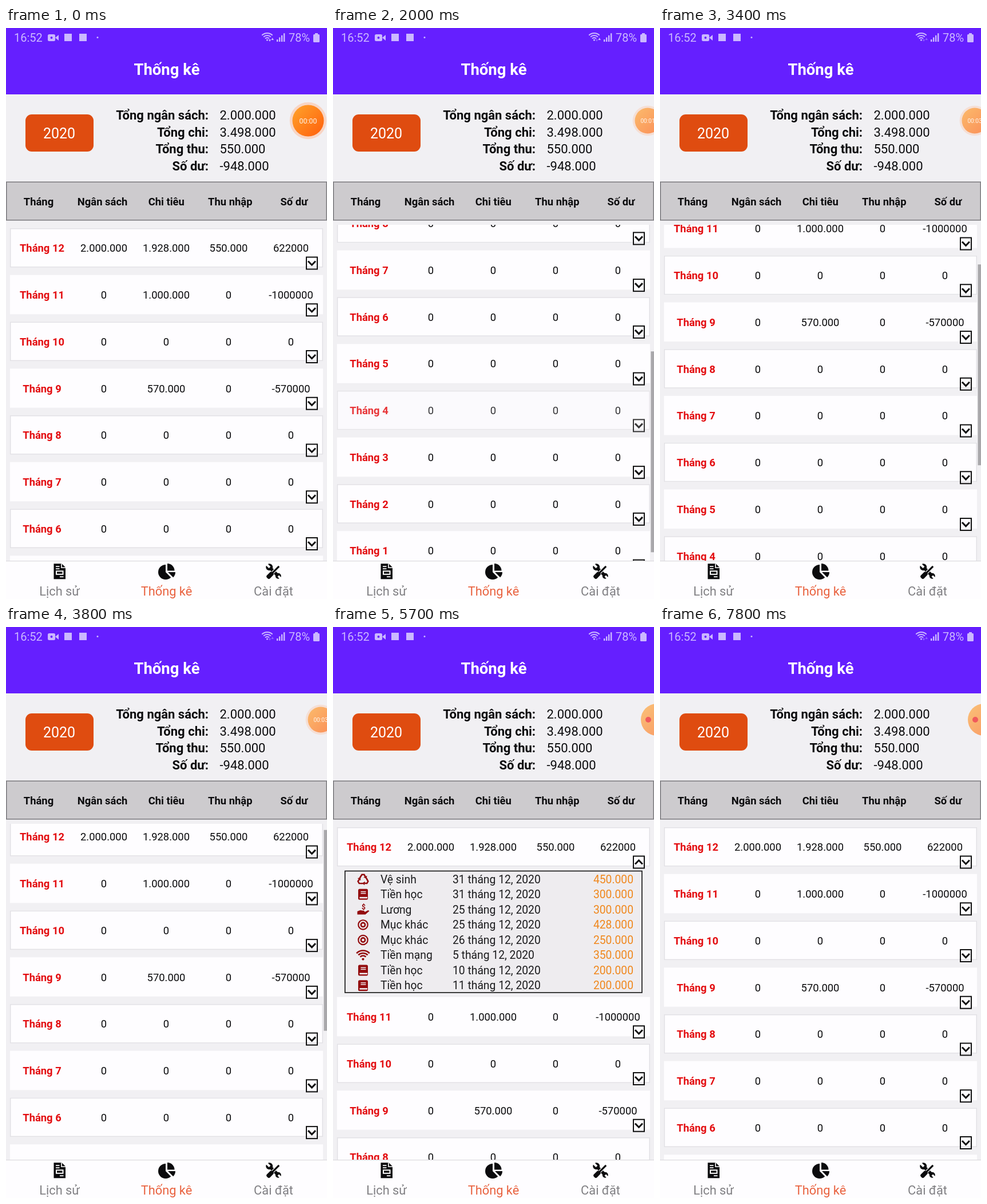
These frames come from a looping animation (561 by 998 pixels, 8000 ms). An HTML page with a canvas:

```html
<!DOCTYPE html>
<html lang="vi">
<head>
<meta charset="utf-8">
<title>Thống kê</title>
<style>
html, body { margin: 0; width: 100%; height: 100%; overflow: hidden; background: #f1f0f3; }
canvas { display: block; }
</style>
</head>
<body>
<canvas id="stage" width="561" height="998"></canvas>
<script>
const ctx = document.getElementById('stage').getContext('2d');
const LOOP = 8000, W = 561;
const VIEW_TOP = 344, VIEW_BOTTOM = 931, MAX_SCROLL = 394;
const PITCH = 81.75, PANEL = 215;
const PURPLE = '#651fff', LILAC = '#cbb8ff', BG = '#f1f0f3', INK = '#0b0b0d', MAROON = '#930c0e';

const COLS = [63, 171, 280, 389, 498];
const FILLED = {
  12: ['2.000.000', '1.928.000', '550.000', '622000'],
  11: ['0', '1.000.000', '0', '-1000000'],
  9: ['0', '570.000', '0', '-570000']
};
const DETAILS = [
  ['recycle', 'Vệ sinh', 31, '450.000'],
  ['book', 'Tiền học', 31, '300.000'],
  ['hand', 'Lương', 25, '300.000'],
  ['target', 'Mục khác', 25, '428.000'],
  ['target', 'Mục khác', 26, '250.000'],
  ['wifi', 'Tiền mạng', 5, '350.000'],
  ['book', 'Tiền học', 10, '200.000'],
  ['book', 'Tiền học', 11, '200.000']
];

// Keyframes as [time, value] pairs, linear in between
const SCROLL = [[420, 0], [600, 40], [800, 100], [1100, 194], [1400, 272], [1600, 300], [1750, 300],
  [2000, 370], [2200, MAX_SCROLL], [2650, MAX_SCROLL], [2900, 322], [3400, 116], [3700, 30], [3900, 6], [4100, 0]];
const BAR_ALPHA = [[400, 0], [500, 1], [4550, 1], [4750, 0]];
const BUBBLE_X = [[900, 528], [1100, 534], [1350, 550], [4930, 550], [5080, 566]];
const BUBBLE_R = [[900, 27.5], [1100, 26], [1350, 22.5], [4930, 22.5], [5080, 28]];
const BUBBLE_ALPHA = [[700, 1], [1050, 0.62]];
const FIRST_ROW = [[4930, 1], [5080, 0.8], [5330, 0.8], [5500, 1], [7230, 1], [7290, 0.8], [7540, 0.8], [7700, 1]];
const BRUSHED_ROW = [[1850, 1], [1920, 0.83], [2000, 0.83], [2150, 1]];

function at(keys, t) {
  if (t <= keys[0][0]) return keys[0][1];
  for (let i = 1; i < keys.length; i++) {
    const [t0, a] = keys[i - 1], [t1, b] = keys[i];
    if (t <= t1) return a + (b - a) * (t - t0) / (t1 - t0);
  }
  return keys[keys.length - 1][1];
}

const easeOut = (t, start, length) =>
  1 - (1 - Math.min(1, Math.max(0, (t - start) / length))) ** 3;

function text(str, x, y, size, color = INK, align = 'center', weight = 400) {
  ctx.font = `${weight} ${size}px Roboto, sans-serif`;
  ctx.textAlign = align;
  ctx.fillStyle = color;
  ctx.fillText(str, x, y);
}

function rect(x, y, w, h, color, radius = 0) {
  ctx.fillStyle = color;
  ctx.beginPath();
  ctx.roundRect(x, y, w, h, radius);
  ctx.fill();
}

function frame(x, y, w, h, color, width) {
  ctx.strokeStyle = color;
  ctx.lineWidth = width;
  ctx.strokeRect(x, y, w, h);
}

function line(points, color, width, cap = 'butt') {
  ctx.strokeStyle = color;
  ctx.lineWidth = width;
  ctx.lineCap = cap;
  ctx.beginPath();
  points.forEach(([x, y]) => ctx.lineTo(x, y));
  ctx.stroke();
}

function poly(points, color) {
  ctx.fillStyle = color;
  ctx.beginPath();
  points.forEach(([x, y]) => ctx.lineTo(x, y));
  ctx.fill();
}

function disc(x, y, r, color) {
  ctx.fillStyle = color;
  ctx.beginPath();
  ctx.arc(x, y, r, 0, 7);
  ctx.fill();
}

function arc(x, y, r, from, to, color, width) {
  ctx.strokeStyle = color;
  ctx.lineWidth = width;
  ctx.lineCap = 'butt';
  ctx.beginPath();
  ctx.arc(x, y, r, from * Math.PI, to * Math.PI);
  ctx.stroke();
}

function placed(x, y, turn, draw) {
  ctx.save();
  ctx.translate(x, y);
  ctx.rotate(turn);
  draw();
  ctx.restore();
}

function waves(x, y, radii, color, width) {
  radii.forEach(r => arc(x, y, r, 1.25, 1.75, color, width));
  disc(x, y - 1, width * 0.8, color);
}

const ICONS = {
  recycle() {
    for (let i = 0; i < 3; i++) placed(0, 1, i * Math.PI * 2 / 3, () => {
      line([[-5.5, -3.5], [-2, -9], [2, -9], [4, -5.5]], MAROON, 2.6);
      poly([[0.8, -4.5], [7, -7], [6, -1.5]], MAROON);
    });
  },
  book() {
    rect(-8.5, -9.5, 17, 19, MAROON, 2.5);
    rect(-4, -5.5, 9, 1.5, BG);
    rect(-4, -2.5, 9, 1.5, BG);
    rect(-6, 4.5, 13.5, 2.5, BG);
  },
  hand() {
    text('$', 1, 0, 12, MAROON, 'center', 700);
    poly([[-10, 3], [-5, 1], [2, 2], [3, 4], [9, 1], [11, 2.5], [4, 8.5], [-10, 8.5]], MAROON);
  },
  target() {
    arc(0, 0, 8.2, 0, 2, MAROON, 2.2);
    arc(0, 0, 3.6, 0, 2, MAROON, 2.6);
  },
  wifi() {
    waves(0, 8, [7, 11.5, 16], MAROON, 2.6);
  }
};

function statusBar(t) {
  text('16:52', 14, 24, 20, LILAC, 'left');
  rect(73, 11, 13, 12, LILAC, 2.5);
  poly([[86, 17], [92, 12], [92, 22]], LILAC);
  disc(79.5, 17, 2, PURPLE);
  rect(102, 10, 13, 13, LILAC);
  rect(128, 10, 13, 13, LILAC);
  disc(160, 16.5, 1.5, LILAC);
  waves(456.5, 22, [5, 9, 13], LILAC, 2);
  const up = t < 2300 ? LILAC : '#8d62ff', down = t < 300 ? LILAC : '#8d62ff';
  poly([[459, 20], [463, 20], [461, 24]], down);
  poly([[463.5, 21], [468, 21], [465.7, 17]], up);
  for (let i = 0; i < 4; i++) rect(473 + i * 4, 20 - i * 3.6, 2.4, 4 + i * 3.6, LILAC);
  text('78%', 494, 24, 20, LILAC, 'left');
  rect(540, 9, 5, 3, LILAC);
  rect(537, 11, 11, 14, LILAC, 1.5);
}

function summary() {
  rect(34, 151, 119, 65, '#df4c10', 11);
  text('2020', 93, 193, 25, '#fff');
  [['Tổng ngân sách:', '2.000.000'], ['Tổng chi:', '3.498.000'], ['Tổng thu:', '550.000'], ['Số dư:', '-948.000']]
    .forEach(([label, value], i) => {
      const y = 160 + i * 29.6;
      text(label, 354, y, 22, INK, 'right', 700);
      text(value, 373.5, y, 22, INK, 'left');
    });
}

function tableHead() {
  rect(0, 268.5, W, 68, '#cdcbce');
  frame(0.75, 269.25, W - 1.5, 66.5, '#7d7c80', 1.5);
  ['Tháng', 'Ngân sách', 'Chi tiêu', 'Thu nhập', 'Số dư']
    .forEach((label, i) => text(label, 57 + i * 111.6, 310, 18.4, INK, 'center', 700));
}

function chevron(y, open) {
  const s = open ? -1 : 1;
  frame(525, y - 10.5, 19, 21, '#111', 2);
  line([[528, y - 3.5 * s], [534.5, y + 3.2 * s], [541, y - 3.5 * s]], '#111', 3);
}

function row(index, y, alpha, open) {
  const month = 12 - index, base = y + 41.3;
  ctx.globalAlpha = alpha;
  rect(7, y, 547, 68.5, '#fefdff');
  if (index % 2 === 0) frame(7.75, y + 0.75, 545.5, 67, '#e2e1e5', 1.5);
  text('Tháng ' + month, COLS[0], base, 18.4, '#e30d10', 'center', 700);
  (FILLED[month] || ['0', '0', '0', '0']).forEach((v, i) => text(v, COLS[i + 1], base, 18.4));
  chevron(y + 61, open);
  ctx.globalAlpha = 1;
}

function panel(growth) {
  ctx.save();
  ctx.beginPath();
  ctx.rect(0, 425, W, PANEL * growth);
  ctx.clip();
  rect(21, 426, 519, 213, '#eeecef');
  frame(21, 426.5, 519, 212.5, '#111', 1.6);
  DETAILS.forEach(([icon, name, day, amount], i) => {
    const y = 440.8 + i * 26.55;
    placed(52.5, y, 0, ICONS[icon]);
    text(name, 83, y + 6.8, 19.3, '#1b1b1d', 'left');
    text(day + ' tháng 12, 2020', 209, y + 6.8, 19.3, '#1b1b1d', 'left');
    text(amount, 525, y + 6.8, 19.3, '#f0871c', 'right');
  });
  ctx.restore();
}

function list(t) {
  const scroll = at(SCROLL, t);
  const growth = easeOut(t, 5330, 350) - easeOut(t, 7530, 265);
  const open = t >= 5370 && t < 7570;
  ctx.save();
  ctx.beginPath();
  ctx.rect(0, VIEW_TOP, W, VIEW_BOTTOM - VIEW_TOP);
  ctx.clip();
  if (growth > 0) panel(growth);
  for (let i = 0; i < 12; i++) {
    const y = 350 + i * PITCH - scroll + (i ? PANEL * growth : 0);
    const alpha = i === 0 ? at(FIRST_ROW, t) : i === 8 ? at(BRUSHED_ROW, t) : 1;
    if (y < VIEW_BOTTOM) row(i, y, alpha, i === 0 && open);
  }
  ctx.globalAlpha = at(BAR_ALPHA, t);
  rect(555.5, VIEW_TOP + scroll * 0.598, 5.5, 351, '#a9a8ab');
  ctx.restore();
}

function bubble(t) {
  const x = at(BUBBLE_X, t), r = at(BUBBLE_R, t), y = 162;
  const recording = t >= 4980;
  const fill = ctx.createLinearGradient(x - r, y - r, x + r, y + r);
  fill.addColorStop(0.1, '#ff9d28');
  fill.addColorStop(0.9, '#ff650f');
  ctx.globalAlpha = at(BUBBLE_ALPHA, t);
  if (!recording) disc(x, y, r * 1.17, '#f8d5c4');
  disc(x, y, r, fill);
  ctx.globalAlpha = 1;
  if (recording) {
    disc(551, y, 5, '#f05a5c');
  } else {
    const seconds = [1000, 2300, 3300, 4400].filter(mark => t >= mark).length;
    text('00:0' + seconds, x, y + r * 0.17, r * 0.45, '#fff4ea');
  }
}

function documentIcon() {
  poly([[-10, -13.5], [4, -13.5], [10.5, -7], [10.5, 13.5], [-10, 13.5]], INK);
  line([[3.5, -13.5], [3.5, -6.5], [10.5, -6.5]], '#fff', 1.6);
  rect(-6.5, -9.5, 6.5, 1.8, '#fff');
  rect(-6.5, -5.5, 6.5, 1.8, '#fff');
  frame(-5.5, -0.5, 11.5, 5.5, '#fff', 2);
  rect(0.5, 8.5, 6.5, 1.8, '#fff');
}

function pieIcon() {
  const wedge = (x, y, r, from, to) => {
    ctx.fillStyle = INK;
    ctx.beginPath();
    ctx.moveTo(x, y);
    ctx.arc(x, y, r, from * Math.PI, to * Math.PI);
    ctx.fill();
  };
  wedge(-2, 1, 13, 0.25, 1.5);
  wedge(1, -1.5, 12.5, 1.5, 2);
  wedge(2, 1, 13, 0, 0.25);
}

function toolsIcon() {
  placed(0, 0, -Math.PI / 4, () => {
    rect(-2.8, -9, 5.6, 24, INK, 2.5);
    disc(0, -11, 6, INK);
    rect(-2, -18, 4, 8, '#fff');
    disc(0, 12, 1.2, '#fff');
  });
  placed(0, 0, Math.PI / 4, () => {
    line([[0, -14], [0, 4]], '#fff', 5.5);
    line([[0, -13], [0, 4]], INK, 3.2);
    rect(-3.8, 2.5, 7.6, 13.5, INK, 3);
  });
  placed(0, 0, -Math.PI / 4, () => {
    disc(0, 11, 5, INK);
    rect(-1.8, 11, 3.6, 7, '#fff');
  });
}

function navBar() {
  rect(0, 931, W, 67, '#fefdff');
  rect(0, 931, W, 1.2, '#dcdbdf');
  placed(93.5, 949.8, 0, documentIcon);
  placed(281, 950, 0, pieIcon);
  placed(468, 950, 0, toolsIcon);
  text('Lịch sử', 93.5, 992, 21.8, '#818084');
  text('Thống kê', 280.5, 992, 21.8, '#e9623f');
  text('Cài đặt', 467.5, 992, 21.8, '#818084');
}

function draw(now) {
  const t = now % LOOP;
  rect(0, 0, W, 998, BG);
  rect(0, 0, W, 116, PURPLE);
  statusBar(t);
  text('Thống kê', 281, 82, 27.5, '#fff', 'center', 700);
  summary();
  tableHead();
  list(t);
  navBar();
  bubble(t);
  requestAnimationFrame(draw);
}
requestAnimationFrame(draw);
</script>
</body>
</html>
```
